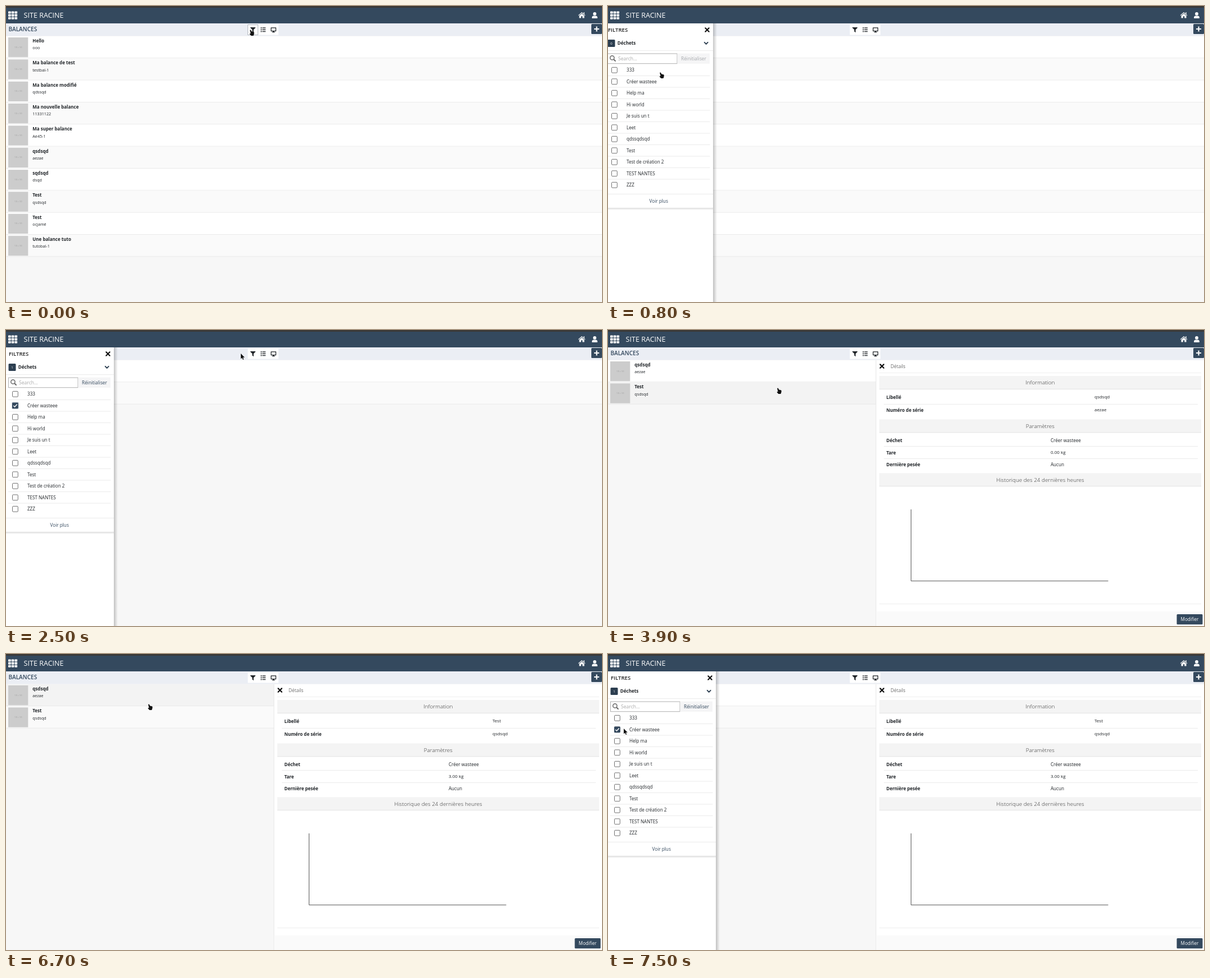
These frames come from a looping animation (1061x528 px, 8000 ms). An HTML page:

```html
<!DOCTYPE html>
<html lang="fr">
<head>
<meta charset="utf-8">
<title>Balances</title>
<style>
  html, body { margin: 0; width: 100%; height: 100%; overflow: hidden; background: #f7f7f7; }
  svg { display: block; width: 100vw; height: 100vh; }
  text { font-family: "Open Sans", "Noto Sans", sans-serif; white-space: pre; }
</style>
</head>
<body>
<svg id="stage" viewBox="0 0 1061 528" xmlns="http://www.w3.org/2000/svg"></svg>
<script>
const NAVY = '#34495e', INK = '#212529', LINE = '#e6e6e6';
const LOOP = 8000, STEP = 100, PITCH = 39.35, PANEL = 192;

const rect = (x, y, w, h, fill, extra = '') =>
  `<rect x="${x}" y="${y}" width="${w}" height="${h}" fill="${fill}" ${extra}/>`;
const text = (x, y, size, str, fill = INK, weight = 400, extra = '') =>
  `<text x="${x}" y="${y}" font-size="${size}" fill="${fill}" font-weight="${weight}" ${extra}>${str}</text>`;
const path = (d, fill, extra = '') => `<path d="${d}" fill="${fill}" ${extra}/>`;
const line = (d, color, width, extra = '') =>
  path(d, 'none', `stroke="${color}" stroke-width="${width}" ${extra}`);
const group = (id, body, extra = '') => `<g id="${id}" ${extra}>${body}</g>`;
const centered = 'text-anchor="middle"';
const cross = (x, y) => line(`M${x - 3.2} ${y - 3.2}l6.4 6.4m0-6.4l-6.4 6.4`, '#111', 2.2, 'stroke-linecap="round"');

// Header and toolbar

function header() {
  let s = rect(0, 0, 1061, 3.5, '#3b3937') + rect(0, 3, 1061, 28, NAVY);
  for (let i = 0; i < 9; i++) {
    s += rect(4 + (i % 3) * 5.7, 9.5 + Math.floor(i / 3) * 5.1, 4.7, 4.1, '#fff', 'rx=".7"');
  }
  s += text(31.5, 21.3, 12.6, 'SITE RACINE', '#fff');
  s += path('M1025 11l6.3 5.4-.8.9-5.5-4.7-5.5 4.7-.8-.9zM1028 11.5h1.8v3l-1.8-1.5z', '#fff');
  s += path('M1025 13.6l4.5 3.8v4.1h-3.2v-3.2h-2.6v3.2h-3.2v-4.1z', '#fff');
  s += '<circle cx="1048" cy="13.9" r="2.9" fill="#fff"/>';
  s += path('M1043.2 22v-1.5q0-3 3-3h3.6q3 0 3 3v1.5z', '#fff');
  return s;
}

function toolbar() {
  let s = rect(0, 31, 1061, 22.5, '#ebeef4') + text(4.5, 45.3, 10.1, 'BALANCES', NAVY, 600);
  s += rect(430.5, 33.5, 54.5, 18, '#fff');
  s += `<rect id="focus" x="430.5" y="33.5" width="18" height="18" fill="none" stroke="#b5bac0"/>`;
  s += path('M435.2 38h8.6q.7.2.2.9l-3.2 3.4v5l-2.4-1.7v-3.3l-3.3-3.4q-.5-.7.1-.9z', INK);
  for (let y = 39; y < 47; y += 3.2) {
    s += rect(453.5, y - .8, 1.8, 1.8, INK) + rect(456.4, y - .6, 5.8, 1.4, INK);
  }
  s += line('M472 38.8h8.4v5.8h-8.4z', INK, 1.3, 'stroke-linejoin="round"');
  s += path('M475.3 44.8h1.8l.4 1.5h1.2v1h-5v-1h1.2z', INK);
  s += rect(1042, 32, 19, 18, NAVY, 'rx="1.5"');
  s += line('M1051.5 36.5v9m-4.5-4.5h9', '#fff', 2.1);
  return s;
}

// List of scales

const ALL = [
  ['Hello', 'ooo'], ['Ma balance de test', 'testbal-1'], ['Ma balance modifié', 'qdssqd'],
  ['Ma nouvelle balance', '11331122'], ['Ma super balance', 'Ae45-1'], ['qsdsqd', 'aezae'],
  ['sqdsqd', 'dsqd'], ['Test', 'qsdsqd'], ['Test', 'ocjamé'], ['Une balance tuto', 'tutobal-1']
];
const MATCHES = [ALL[5], ALL[7]];

const list = items => items.map(([name, serial], i) => {
  const y = 54 + i * PITCH;
  return rect(0, y, 1061, PITCH, '#fff', 'class="row"')
    + rect(0, y + PITCH - 1, 1061, .8, LINE)
    + rect(4, y + 2, 35.3, 35.3, '#ccc')
    + text(21.7, y + 20.6, 3, '100 x 100', '#a2a2a2', 400, centered)
    + text(47.3, y + 11, 8, name, INK, 700)
    + text(47.3, y + 23.2, 7.2, serial);
}).join('');

// Detail pane

function bar(y, title) {
  return rect(483, y, 573, 23.5, '#f4f4f4') + rect(483, y + 23, 573, .8, '#dedede')
    + text(769.3, y + 15.2, 9.9, title, '#333', 300, centered);
}

function details() {
  let s = rect(477, 54, 584, 474, '#fff') + rect(476.5, 54, 1, 474, LINE);
  s += cross(487.7, 64.6) + text(503, 67.7, 8.3, 'Détails', '#6c6c6c');
  s += rect(483, 76, 573, .8, '#ececec');
  s += bar(82, 'Information') + bar(159.5, 'Paramètres') + bar(255.3, 'Historique des 24 dernières heures');
  for (const y of [132, 207.2, 229]) s += rect(491, y, 559, .8, LINE);
  const labels = [['Libellé', 123], ['Numéro de série', 146], ['Déchet', 200], ['Tare', 221.6], ['Dernière pesée', 243.4]];
  for (const [label, y] of labels) s += text(495.5, y, 8, label, INK, 700);
  s += text(866, 122.3, 8, '', INK, 400, 'id="label"') + text(866, 145.2, 8, '', INK, 400, 'id="serial"');
  s += text(788, 199.8, 8.1, 'Créer wasteee') + text(788, 220.6, 8, '', INK, 400, 'id="tare"');
  s += text(788, 243.2, 8.1, 'Aucun');
  s += line('M539.5 320v127.7h351', '#555', 1);
  s += rect(483, 488.3, 573, .8, '#e9e9e9') + rect(477.5, 502, 584, 26, '#fafafa');
  s += rect(1012.5, 507, 46, 18.3, NAVY, 'rx="1.5"');
  return s + text(1035.5, 519.3, 8.1, 'Modifier', '#fff', 400, centered);
}

// Filter panel

const WASTES = ['333', 'Créer wasteee', 'Help ma', 'Hi world', 'Je suis un t', 'Leet',
  'qdssqdsqd', 'Test', 'Test de création 2', 'TEST NANTES', 'ZZZ'];

function filters() {
  let s = rect(PANEL, 31, 7, 497, 'url(#side)') + rect(0, 31, PANEL, 497, '#fff');
  s += text(5, 46, 9.6, 'FILTRES', '#222', 600) + cross(181.5, 42.5);
  s += rect(4.5, 60, 13, 13, '#2c3e50', 'rx="1.5"');
  s += text(11, 68.8, 6, '0', '#fff', 400, `id="count" ${centered}`);
  s += text(21.8, 69.2, 8.1, 'Déchets', INK, 700);
  s += line('M176.7 64.8l3 3 3-3', '#2c3e50', 1.9, 'stroke-linecap="round"');
  s += rect(0, 79.3, PANEL, .8, LINE);
  s += rect(4.5, 85, 123.5, 17.7, '#fff', 'stroke="#b0b0b0"');
  s += '<circle cx="12.4" cy="92.4" r="3.6" fill="none" stroke="#666" stroke-width="1.5"/>';
  s += line('M15.2 95.2l3.4 3.4', '#666', 2);
  s += text(23, 96.7, 8.6, 'Search...', '#aaa');
  s += rect(128.5, 84.5, 57.5, 18.5, '#f5f5f6');
  s += text(135, 96.6, 8.3, 'Réinitialiser', '#a5a8ac', 400, 'id="reset"');
  WASTES.forEach((name, i) => {
    const y = 114 + i * 20.5;
    s += rect(11.5, y - 4.6, 9.8, 9.8, '#fff', 'rx="1.3" stroke="#707070"');
    s += text(38, y + 3, 8.1, name);
    if (i < 10) s += rect(4, y + 10.1, 182.5, .8, LINE);
  });
  s += group('tick',
    rect(10, 128.3, 12.8, 12.8, '#d5dbe2', 'id="glow" rx="2"')
    + rect(11, 129.4, 10.8, 10.8, NAVY, 'rx="1.3"')
    + line('M13.3 135l2.2 2.2 4.2-4.7', '#fff', 1.5));
  s += rect(0, 335, PANEL, .8, LINE);
  s += text(95.2, 350.7, 8.2, 'Voir plus', NAVY, 400, centered);
  return s + rect(0, 360.3, PANEL, 1.2, '#cfcfcf') + rect(0, 361.5, PANEL, 2, '#f0f0f0');
}

const arrow = path('M0 0v9.4l2.2-2 1.6 3.6 1.5-.7-1.6-3.4h3.1z', '#111');
const hand = path('M2.2 1.3q.5-1.2 1.7-.5l1.5 2.7 3.4.8q1.1.4 1 1.7l-.5 3.1-.9 1.9h-4l-2.5-2.7q-.5-1 .4-1.4l1.3.3z', '#111');

const $ = id => document.getElementById(id);
$('stage').innerHTML =
  `<defs><linearGradient id="side"><stop stop-color="#000" stop-opacity=".22"/>
   <stop offset="1" stop-color="#000" stop-opacity="0"/></linearGradient></defs>`
  + rect(0, 0, 1061, 528, '#f7f7f7')
  + group('all', list(ALL)) + group('matches', list(MATCHES))
  + toolbar() + group('details', details()) + group('filters', filters()) + header()
  + group('arrow', arrow) + group('hand', hand);

// Pointer: time, x, y, shape, glide towards the next point
const POINTER = [
  [0, 432, 42, 'hand'], [300, 432, 42, 'hand', 1], [600, 222, 88, 'hand', 1],
  [800, 90, 118, 'hand', 1], [1000, 15, 140, 'arrow', 1], [1200, 0, 142, 'arrow', 1],
  [1500, 22, 133, 'hand'], [1700, 22, 133, 'hand', 1], [1900, 90, 124, 'arrow', 1],
  [2200, 310, 72, 'arrow', 1], [2500, 418, 42, 'arrow'],
  [3900, 299, 103, 'hand'], [4400, 308, 92, 'hand'], [4600, 346, 57, 'hand'],
  [4800, 394, 53, 'arrow'], [5000, 414, 46, 'arrow'], [5200, 428, 43, 'hand'],
  [5500, 380, 17, 'arrow'], [6000, 324, 32, 'arrow'], [6200, 420, 41, 'arrow'],
  [6300, 443, 41, 'hand'], [6500, 442, 41, 'hand'], [6700, 251, 89, 'hand'],
  [7000, 119, 124, 'arrow'], [7200, 60, 131, 'arrow'], [7300, 36, 133, 'arrow'],
  [7500, 28, 133, 'arrow']
];

function pointerAt(t) {
  const i = POINTER.findLastIndex(p => p[0] <= t);
  const [t0, x, y, shape, glide] = POINTER[i];
  if (!glide) return { x, y, shape };
  const [t1, x1, y1] = POINTER[i + 1];
  const k = (t - t0) / (t1 - t0);
  return { x: x + (x1 - x) * k, y: y + (y1 - y) * k, shape };
}

function panelEdge(t) {
  if (t >= 3900) return t >= 7000 ? PANEL : 0;
  const p = Math.min(1, Math.max(0, (t - 549) / 300));
  return Math.round(PANEL * (1 - (1 - p) ** 2));
}

const show = (id, on) => $(id).style.display = on ? '' : 'none';
const rows = id => [...$(id).querySelectorAll('.row')];
const rowSets = [rows('all'), rows('matches')];

function render(t) {
  const filtered = t >= 1800, edge = panelEdge(t), p = pointerAt(t);
  show('all', !filtered);
  show('matches', filtered);
  show('details', t >= 3900);
  show('filters', edge > 0);
  $('filters').setAttribute('transform', `translate(${edge - PANEL} 0)`);
  show('focus', t < 500 || (t >= 6300 && t < 6700));
  show('tick', t >= 1600);
  show('glow', t < 3900);
  $('count').textContent = filtered ? '1' : '0';
  $('reset').setAttribute('fill', filtered ? NAVY : '#a5a8ac');

  const [label, serial, tare] = t < 4100 ? ['qsdsqd', 'aezae', '0.00 kg'] : ['Test', 'qsdsqd', '3.00 kg'];
  $('label').textContent = label;
  $('serial').textContent = serial;
  $('tare').textContent = tare;

  const hover = p.x > edge ? Math.floor((p.y - 54) / PITCH) : -1;
  for (const set of rowSets) {
    set.forEach((row, i) => row.setAttribute('fill', i === hover ? '#f3f3f3' : i % 2 ? '#fafafa' : '#fff'));
  }
  for (const shape of ['arrow', 'hand']) {
    show(shape, p.shape === shape);
    $(shape).setAttribute('transform', `translate(${p.x} ${p.y})`);
  }
}

const start = performance.now();
function tick() {
  const t = Math.max(0, performance.now() - start) % LOOP;
  render(Math.floor(t / STEP) * STEP);
  requestAnimationFrame(tick);
}
tick();
</script>
</body>
</html>
```
